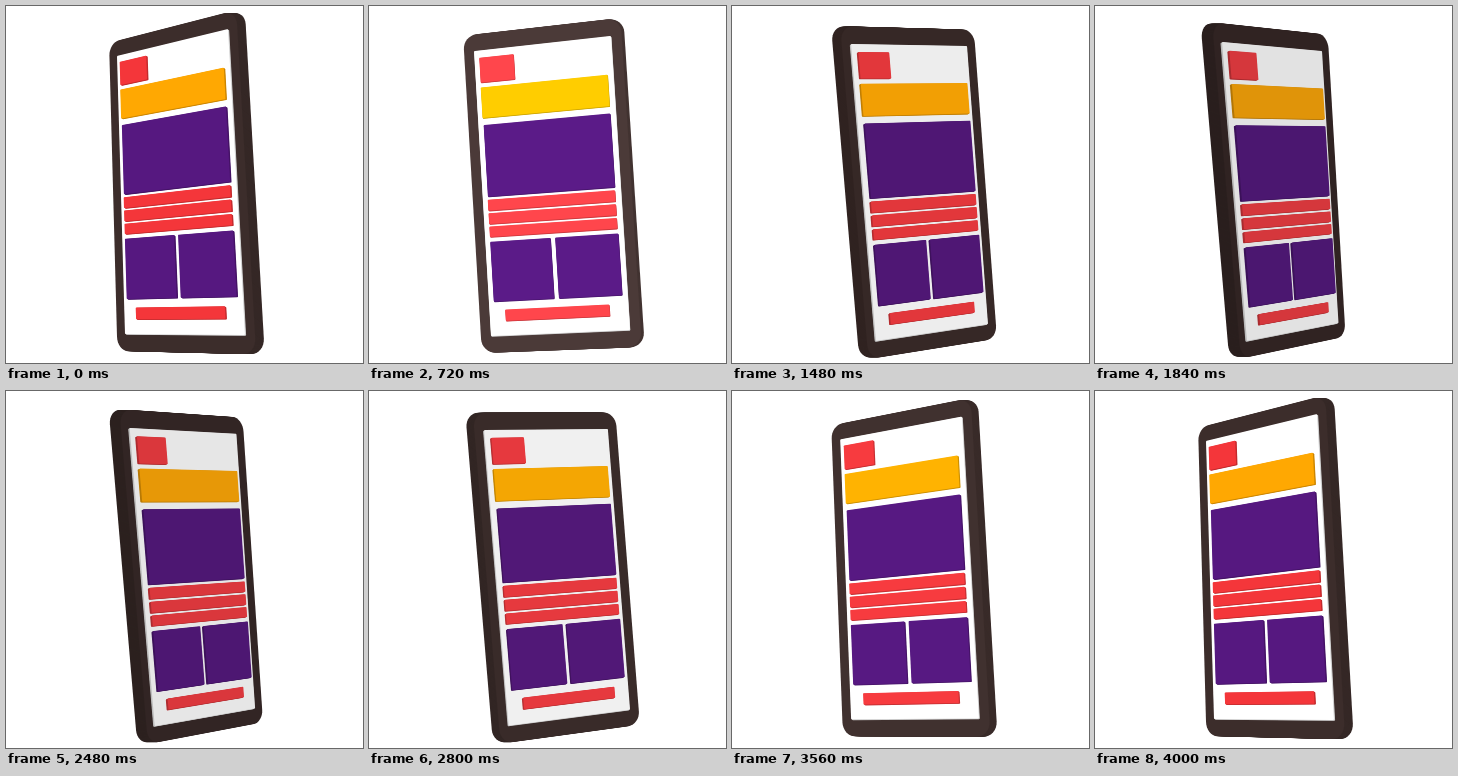
Animation of 357x357 px, one loop 4.04 s. Source, as an HTML page with a canvas:

```html
<!DOCTYPE html>
<html lang="en">
<head>
<meta charset="utf-8">
<title>Turning phone</title>
<style>
html, body { margin: 0; width: 100%; height: 100%; overflow: hidden; background: #fff; }
canvas { display: block; width: 100vw; height: 100vh; }
</style>
</head>
<body>
<canvas id="stage" width="357" height="357"></canvas>
<script>
const ctx = document.getElementById('stage').getContext('2d');
const LOOP = 4040, STEP = 40;

// Yaw in degrees over time in ms
const TURN = [[0, 35], [560, 19.5], [720, 11], [1120, -15], [1480, -37.5], [1840, -50.6],
  [2070, -53], [2480, -45.3], [2800, -30], [3160, 10.5], [3360, 22.5], [4000, 35]];

// Screen corners (TL, TR, BR, BL as x, y) and palette at four yaws
const POSES = [
  { yaw: 35, quad: [111, 50, 222, 23, 239, 329, 119, 328],
    body: [60, 45, 43], red: [244, 54, 58], gold: [255, 168, 2], purple: [86, 24, 128], white: [255, 255, 255] },
  { yaw: 11, quad: [105, 45, 242, 30, 261, 324, 122, 330],
    body: [75, 58, 56], red: [255, 70, 76], gold: [255, 205, 0], purple: [91, 27, 136], white: [255, 255, 255] },
  { yaw: -37.5, quad: [119, 38, 235, 40, 256, 318, 144, 335],
    body: [54, 40, 38], red: [226, 55, 59], gold: [242, 159, 4], purple: [79, 23, 116], white: [237, 237, 237] },
  { yaw: -50.6, quad: [127, 36, 227, 45, 243.5, 317, 152, 335],
    body: [48, 35, 34], red: [213, 55, 60], gold: [224, 148, 9], purple: [75, 23, 112], white: [226, 226, 226] }
];

// Blocks on the screen: colour, left, top, right, bottom (0 to 1)
const BLOCKS = [
  ['red', .04, .026, .295, .114],
  ['gold', .038, .131, .962, .239],
  ['purple', .043, .264, .963, .515],
  ['red', .04, .526, .961, .564],
  ['red', .04, .573, .961, .611],
  ['red', .04, .62, .961, .656],
  ['purple', .04, .673, .482, .881],
  ['purple', .516, .673, .965, .881],
  ['red', .12, .911, .87, .95]
];

function yawAt(t) {
  const slope = i => {
    const a = TURN[i - 1], b = TURN[i], c = TURN[i + 1];
    if (!a || !c || (b[1] - a[1]) * (c[1] - b[1]) <= 0) return 0;
    return (c[1] - a[1]) / (c[0] - a[0]);
  };
  const i = TURN.findIndex(k => k[0] > t) - 1;
  if (i < 0) return TURN[TURN.length - 1][1];
  const [t0, y0] = TURN[i], [t1, y1] = TURN[i + 1];
  const d = t1 - t0, s = (t - t0) / d, s2 = s * s, s3 = s2 * s;
  return y0 * (2 * s3 - 3 * s2 + 1) + y1 * (3 * s2 - 2 * s3)
    + d * (slope(i) * (s3 - 2 * s2 + s) + slope(i + 1) * (s3 - s2));
}

// Smooth blend of the corner positions
function quadAt(yaw) {
  const weights = POSES.map(p => POSES.reduce(
    (w, o) => o === p ? w : w * (yaw - o.yaw) / (p.yaw - o.yaw), 1));
  return POSES[0].quad.map((_, i) => POSES.reduce((sum, p, k) => sum + weights[k] * p.quad[i], 0));
}

function colourAt(name, yaw) {
  let i = 0;
  while (i < POSES.length - 2 && yaw < POSES[i + 1].yaw) i++;
  const a = POSES[i], b = POSES[i + 1];
  const f = Math.min(1, Math.max(0, (a.yaw - yaw) / (a.yaw - b.yaw)));
  return a[name].map((v, k) => v + (b[name][k] - v) * f);
}

const css = (c, k = 1) => `rgb(${c.map(v => Math.min(255, Math.round(v * k))).join(',')})`;

// Perspective map from the unit square to a quad
function project([x0, y0, x1, y1, x2, y2, x3, y3]) {
  const ax = x1 - x2, ay = y1 - y2, bx = x3 - x2, by = y3 - y2;
  const sx = x0 - x1 + x2 - x3, sy = y0 - y1 + y2 - y3;
  const det = ax * by - bx * ay;
  const g = (sx * by - bx * sy) / det, h = (ax * sy - sx * ay) / det;
  return (u, v) => {
    const w = g * u + h * v + 1;
    return [((x1 - x0 + g * x1) * u + (x3 - x0 + h * x3) * v + x0) / w,
            ((y1 - y0 + g * y1) * u + (y3 - y0 + h * y3) * v + y0) / w];
  };
}

// Rounded rectangle on the screen plane, as projected points
function outline(map, l, t, r, b, rx) {
  const ry = rx * .485, pts = [];
  const corners = [[r - rx, t + ry, -90], [r - rx, b - ry, 0], [l + rx, b - ry, 90], [l + rx, t + ry, 180]];
  for (const [cx, cy, start] of corners) {
    for (let k = 0; k <= 8; k++) {
      const a = (start + k * 11.25) * Math.PI / 180;
      pts.push(map(cx + rx * Math.cos(a), cy + ry * Math.sin(a)));
    }
  }
  return pts;
}

function fill(pts, colour, dx = 0, dy = 0) {
  ctx.beginPath();
  for (const [x, y] of pts) ctx.lineTo(x + dx, y + dy);
  ctx.closePath();
  ctx.fillStyle = colour;
  ctx.fill();
}

// A slab: swept side from back to front, then its face
function slab(pts, face, side, dx, dy, lift = 0) {
  const n = Math.max(1, Math.ceil(Math.abs(dx) + Math.abs(dy)));
  for (let k = n; k > 0; k--) fill(pts, side, dx * k / n - lift, dy * k / n);
  fill(pts, face, -lift);
}

function draw(t) {
  const yaw = yawAt(t), turn = Math.sin(yaw * Math.PI / 180);
  const map = project(quadAt(yaw));
  ctx.fillStyle = '#fff';
  ctx.fillRect(0, 0, 357, 357);

  const body = colourAt('body', yaw), white = colourAt('white', yaw);
  slab(outline(map, -.075, -.058, 1.075, 1.058, .1), css(body), css(body, .88), 15 * turn, 0);
  slab(outline(map, 0, 0, 1, 1, .008), css(white), css(white, .82), 2 * turn, .8);

  for (const [name, l, top, r, b] of BLOCKS) {
    const c = colourAt(name, yaw);
    slab(outline(map, l, top, r, b, .006), css(c), css(c, .8), 2.5 * turn, .8, 2.8 * turn);
  }
}

function tick(now) {
  draw(Math.floor(now % LOOP / STEP) * STEP);
  requestAnimationFrame(tick);
}
draw(0);
requestAnimationFrame(tick);
</script>
</body>
</html>
```
